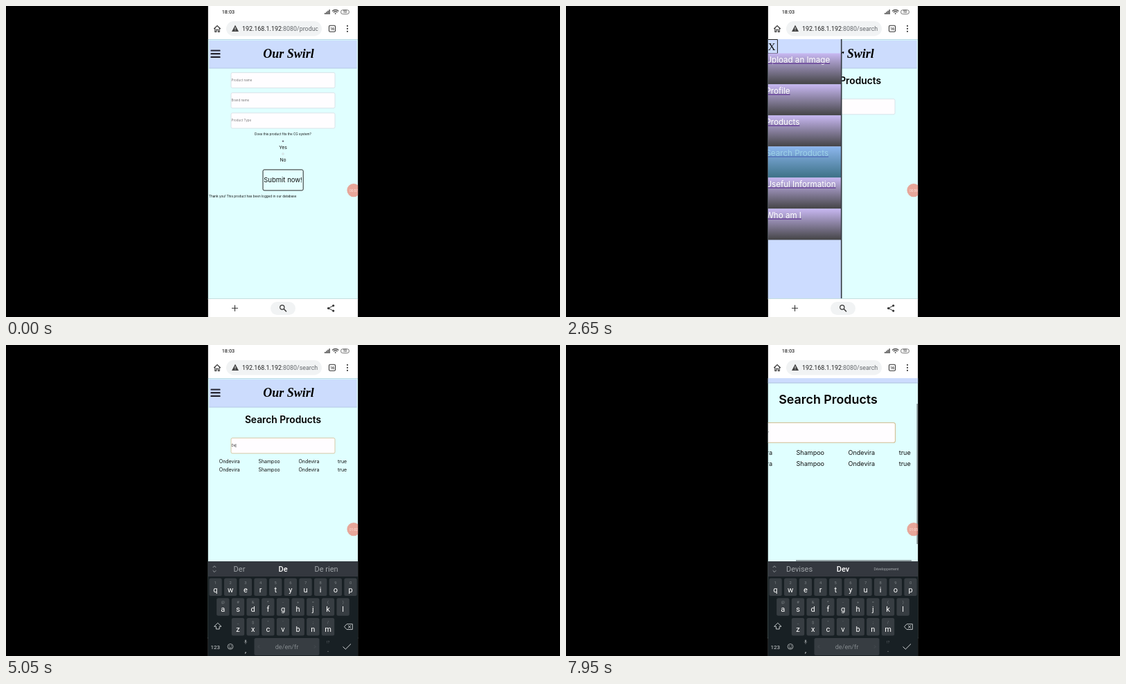
Write an HTML page with a canvas that moves like this. It is 800 px wide and 450 px high and loops after 8 s.

```html
<!DOCTYPE html>
<html lang="en">
<head>
<meta charset="utf-8">
<title>Product search demo</title>
<style>
  html, body { margin: 0; width: 100%; height: 100%; overflow: hidden; background: #000; }
  canvas { display: block; width: 100vw; height: 100vh; }
</style>
</head>
<body>
<canvas id="stage"></canvas>
<script>
const canvas = document.getElementById('stage');
const ctx = canvas.getContext('2d');
const ratio = window.devicePixelRatio || 1;
canvas.width = 800 * ratio;
canvas.height = 450 * ratio;

const LOOP = 8000, STEP = 50;
const LEFT = 291.6, TOP = 48, WIDTH = 216.7;
const SANS = 'Inter, sans-serif', UI = 'Roboto, sans-serif', SERIF = '"Liberation Serif", serif';
const TIMES = { open: 150, close: 2630, hover: 2300, search: 2650, rows: 2800, focus: 3750,
                keyboard: 3900, typed: [4700, 4950, 5450], zoom: 7800 };

const MENU = ['Upload an Image', 'Profile', 'Products', 'Search Products', 'Useful Information', 'Who am I'];
const ROWS = `Ondevira|Shampoo|Ondevira|true
Ondevira|Shampoo|Ondevira|true
e;flke;lkfle|e;lrkf;lerkf|;ewlkf;ewlkdf|
e;flkg;elrf|e;flk;elfk|e;lfk;elfkv|
elkf;elkrf|feferferf|esfsef|
dsfvzdsfgsfd|asfsdf|sfdsdfsd|true
dsfvsdfv|sdfvdsf|sdfvsdfv|
sdfsdf|asdfasdf|sfdvsfdv|
dlfkjdlfkjdlkjsklf|sdlkfjsl;kfj|sdfdks;ldkfkls|
sadfas|adfasd|adsfasd|
asdfasdf|adsfasd|adsfasdf|
ffff|fff|fff|
elkfjlekrf|lkfjlekjdf|lekfjlkjdf|true
asdfasda|asdfasdf|sdfasdf|true
sadfasdadsfasa|adfasdf|sdfasdf|
sdfasdfad|adfasdf|asdfasdf|true
fadfadf|adfasdaf|adsfadf|true
asdfasdf|adfasdf|adfasdfa|true
Hdjd|Dudud|Djdhd|false
funky chicken|conditioner|spiced brand|false
dganit|dganit|dganit|true
dddd|dddd|dddd|`.split('\n').map(row => row.split('|'));

const clamp = v => Math.min(1, Math.max(0, v));
const cubic = (u, a, b) => 3 * u * (1 - u) ** 2 * a + 3 * u * u * (1 - u) * b + u ** 3;

// CSS "ease" timing curve
function ease(p) {
  let lo = 0, hi = 1;
  for (let i = 0; i < 20; i++) {
    const mid = (lo + hi) / 2;
    if (cubic(mid, .25, .25) < p) lo = mid; else hi = mid;
  }
  return cubic(hi, .1, 1);
}

function rect(x, y, w, h, fill) {
  ctx.fillStyle = fill;
  ctx.fillRect(x, y, w, h);
}

function box(x, y, w, h, r, fill, stroke, line = 1) {
  ctx.beginPath();
  ctx.roundRect(x, y, w, h, r);
  if (fill) { ctx.fillStyle = fill; ctx.fill(); }
  if (stroke) { ctx.strokeStyle = stroke; ctx.lineWidth = line; ctx.stroke(); }
}

function circle(x, y, r, fill, stroke, line = 1) {
  box(x - r, y - r, 2 * r, 2 * r, r, fill, stroke, line);
}

function path(d, stroke, line = 1, fill) {
  const shape = new Path2D(d);
  if (fill) { ctx.fillStyle = fill; ctx.fill(shape); }
  if (stroke) { ctx.strokeStyle = stroke; ctx.lineWidth = line; ctx.stroke(shape); }
}

// y is the middle of the capitals
function text(str, x, y, size, color = '#111', align = 'left', family = SANS, style = '') {
  ctx.font = `${style} ${size}px ${family}`;
  ctx.textAlign = align;
  ctx.fillStyle = color;
  ctx.fillText(str, x, y + size * .36);
}

function clipped(x, y, w, h, draw) {
  ctx.save();
  ctx.beginPath();
  ctx.rect(x, y, w, h);
  ctx.clip();
  draw();
  ctx.restore();
}

function browserBar(address) {
  rect(LEFT, 0, WIDTH, TOP, '#fff');
  text('18:03', 311.7, 8.8, 7.3, '#333', 'left', UI, '500');
  for (let i = 0; i < 4; i++) rect(460 + i * 2.1, 10 - i * 1.6, 1.6, 2 + i * 1.6, '#555');
  path('M471 7.5Q475.7 3.5 480.4 7.5M472.8 9.2Q475.7 6.8 478.6 9.2', '#555', 1.3);
  circle(475.7, 11, 1, '#555');
  box(483.5, 5.7, 12, 6, 3, null, '#666', .9);
  text('50', 489.5, 8.8, 4.6, '#444', 'center', UI, '500');

  path('M300.3 33L305 28.5L309.7 33M301.8 32V37.5H303.7V34.3H306.3V37.5H308.2V32', '#333', 1.1);
  box(318, 22, 138, 21.5, 10.7, '#f1f3f4');
  path('M331 27.5L336 37H326Z', null, 0, '#444');
  rect(330.5, 30.8, 1, 3, '#f1f3f4');
  rect(330.5, 34.6, 1, 1, '#f1f3f4');
  clipped(340, 22, 110.5, 22, () => {
    text('192.168.1.192', 341, 33, 8.9, '#222', 'left', UI);
    text(':8080/' + address, 341 + ctx.measureText('192.168.1.192').width, 33, 8.9, '#666a6e', 'left', UI);
  });
  box(466.5, 28.2, 9, 9, 1.5, null, '#333', 1.1);
  text('16', 471, 32.8, 5, '#333', 'center', UI, 'bold');
  for (const y of [28.8, 32.8, 36.8]) circle(493, y, 1.1, '#333');
}

function bottomBar() {
  rect(LEFT, 423, WIDTH, 1, '#c5dede');
  rect(LEFT, 424, WIDTH, 26, '#fff');
  path('M326 437.2H335M330.5 432.7V441.7', '#333', 1.1);
  box(382, 428, 36, 19, 9.5, '#f1f3f4');
  circle(398.8, 436, 3.1, null, '#333', 1.2);
  path('M401.1 438.3L405 442.2', '#333', 1.4);
  path('M472.6 433.6L465.6 437.3L472.6 441', '#333', 1);
  for (const [x, y] of [[472.7, 433.5], [465.6, 437.3], [472.7, 441.1]]) circle(x, y, 1.6, '#333');
}

function pageHeader() {
  rect(LEFT, TOP, WIDTH, 377, '#e0ffff');
  rect(LEFT, 48, WIDTH, 1.2, '#bcd8e8');
  rect(293, 50, 214, 40, '#ccdcfd');
  rect(293, 89.5, 214, 1, '#b6c9e6');
  for (const y of [63.4, 68.1, 72.8]) box(295.5, y, 14, 2.2, .6, '#252530');
  text('Our Swirl', 408, 68.5, 18, '#000', 'center', SERIF, 'italic bold');
}

function field(y, hint, border = '#d5dde4') {
  box(325, y, 150, 22.2, 2, '#fffdff', border, .8);
  text(hint, 325.6, y + 11, 4.5, '#777');
}

function productPage() {
  ['Product name', 'Brand name', 'Product Type'].forEach((hint, i) => field(96.4 + i * 29.2, hint));
  text('Does this product fits the CG system?', 400, 185, 4.6, '#111', 'center');
  circle(400, 195.6, 1.2, '#667');
  text('Yes', 400, 204.2, 6.8, '#111', 'center');
  circle(400, 214, 1.3, '#eef8f8', '#b5c5c8', .5);
  text('No', 400, 223, 6.8, '#111', 'center');
  box(371, 236.9, 58.2, 30, 2, '#e4ffff', '#2a2a2a');
  text('Submit now!', 400, 252, 9.5, '#111', 'center');
  text('Thank you! This product has been logged in our database', 293, 275, 4.65);
}

function tableRow(cells, y) {
  ctx.font = `7px ${SANS}`;
  const widths = cells.map(cell => ctx.measureText(cell).width);
  const gap = (211 - widths.reduce((a, b) => a + b)) / cells.length;
  let x = 294.5 + gap / 2;
  cells.forEach((cell, i) => {
    text(cell, x, y, 7);
    x += widths[i] + gap;
  });
}

function searchPage(t, typed) {
  const focused = t >= TIMES.focus;
  text('Search Products', 400, 108.3, 13.8, '#000', 'center', SANS, '600');
  field(134.6, typed ? '' : 'Search a Product', focused ? '#d0bd91' : undefined);
  if (typed) text(typed, 325.6, 145.8, 4.4, '#222');
  if (focused && cursorOn(t)) {
    ctx.font = `4.4px ${SANS}`;
    rect(325.9 + ctx.measureText(typed).width, 143, .6, 5.2, '#222');
  }
  if (t < TIMES.rows) return;
  const rows = typed ? ROWS.slice(0, 2) : ROWS;
  rows.forEach((cells, i) => tableRow(cells, 168.4 + i * 12.2));
}

function cursorOn(t) {
  const restart = [TIMES.focus, ...TIMES.typed, 7200].filter(k => k <= t).pop();
  return (t - restart) % 1000 < 500;
}

function menu(t) {
  const open = t < TIMES.close ? ease(clamp((t - TIMES.open) / 500))
                               : 1 - ease(clamp((t - TIMES.close) / 450));
  if (open <= 0) return;
  ctx.save();
  ctx.translate(-111 * (1 - open), 0);
  rect(LEFT, TOP, 109, 376, '#ccdcff');
  box(292.5, 48.5, 16, 20, 0, null, '#222');
  text('X', 300.3, 59, 15, '#111', 'center', SERIF);
  MENU.forEach((label, i) => {
    const y = 68.4 + i * 45;
    const shade = ctx.createLinearGradient(0, y, 0, y + 45);
    shade.addColorStop(0, '#c8b8f2');
    shade.addColorStop(1, '#444446');
    rect(LEFT, y, 109, 45, shade);
    text(label, 291.5, y + 9, 11.6, i === 3 && t >= TIMES.hover ? '#e4e4ea' : '#fff');
    rect(291.5, y + 14.2, ctx.measureText(label).width, 1, '#52208c');
    if (i === 3 && t >= TIMES.search && t < 2800) rect(LEFT, y, 109, 45, 'rgba(51,181,229,.4)');
  });
  rect(400, TOP, 1.6, 376, '#333840');
  ctx.restore();
}

function keyRow(letters, hints, firstX, y, upper) {
  [...letters].forEach((letter, i) => {
    const x = firstX + i * 21.67;
    box(x - 9.2, y, 18.4, 25.5, 2.5, '#373d42');
    text(hints[i], x, y + 6, 5.8, '#7b8084', 'center', UI);
    text(upper ? letter.toUpperCase() : letter, x, y + 16.2, 11, '#fff', 'center', UI);
  });
}

function keyboard(t, typed) {
  if (t < TIMES.keyboard) return;
  const p = clamp((t - TIMES.keyboard + STEP) / 300);
  ctx.save();
  ctx.translate(0, 137 * (1 - p) ** 2);
  rect(LEFT, 313, WIDTH, 137, '#182024');
  rect(LEFT, 313, WIDTH, 22, '#34383f');
  path('M298.7 322L301 319.7L303.3 322M298.7 326.3L301 328.6L303.3 326.3', '#a0a5a9', .9);
  const [before, after, size] = { De: ['Der', 'De rien', 11], Dev: ['Devises', 'Développement', 5.2] }[typed] || ['', '', 11];
  text(before, 337, 324.3, 11, '#a0a5a9', 'center', UI);
  text(typed, 400, 324.3, 11, '#fff', 'center', UI, '500');
  text(after, 462.5, 324.3, size, '#a0a5a9', 'center', UI);

  const upper = !typed;
  keyRow('qwertyuiop', '1234567890', 302.5, 337.5, upper);
  keyRow('asdfghjkl', '@#&*-+=()', 313.3, 366.2, upper);
  keyRow('zxcvbnm', '_$"\':;/', 335, 395, upper);
  path('M305.8 402.2L311 407.3H308.2V411H303.4V407.3H300.6Z', '#d5d8da', .9, upper ? '#d5d8da' : null);
  path('M488.5 407.7L492 403.8H500.3V411.6H492ZM494 405.8L498 409.7M498 405.8L494 409.7', '#d5d8da', .9);

  text('123', 302.3, 436.7, 8, '#d5d8da', 'center', UI);
  circle(324, 436.4, 3.9, null, '#c5c8ca', .8);
  circle(322.6, 435.3, .6, '#c5c8ca');
  circle(325.4, 435.3, .6, '#c5c8ca');
  path('M321.8 437.4Q324 440 326.2 437.4', '#c5c8ca', .8);
  box(344.9, 426.5, 2.2, 4, 1.1, '#83888b');
  path('M343.8 429.5Q346 433 348.2 429.5M346 431.3V433', '#83888b', .6);
  text(',', 346, 441, 10, '#fff', 'center', UI);
  box(358.5, 424, 94, 25, 2.5, '#373d42');
  text('de/en/fr', 405.5, 436.8, 9.1, '#848a8e', 'center', UI);
  path('M366 434.5L364 436.5L366 438.5M445 434.5L447 436.5L445 438.5', '#4d5459', .8);
  text('!?', 465, 430, 5.8, '#60666a', 'center', UI);
  text('.', 465, 440, 10, '#aaa', 'center', UI);
  path('M486.5 436.5L490.3 440.2L498 432.5', '#d5d8da', 1);
  ctx.restore();
}

function timerBadge(t) {
  const seconds = 57 + Math.floor((t + 50) / 1000);
  const pad = n => String(n).padStart(2, '0');
  circle(502, 266.6, 9.6, 'rgba(236,118,98,.64)');
  text(`${pad(Math.floor(seconds / 60))}:${pad(seconds % 60)}`, 502, 266.8, 4.9, '#fbe4de', 'center', UI);
}

function page(t, typed) {
  const zoom = 1 + .293 * clamp((t - TIMES.zoom) / 150);
  ctx.save();
  ctx.translate(473.4, 210);
  ctx.scale(zoom, zoom);
  ctx.translate(-473.4, -210);
  pageHeader();
  if (t < TIMES.search) productPage(); else searchPage(t, typed);
  ctx.restore();
  if (zoom > 1) {
    rect(LEFT + WIDTH - 2, 85, 2, 203, '#8d9a9d');
    rect(332, 311, 167, 1.8, '#8d9a9d');
  }
}

function draw(t) {
  const typed = 'Dev'.slice(0, TIMES.typed.filter(k => k <= t).length);
  ctx.setTransform(ratio, 0, 0, ratio, 0, 0);
  rect(0, 0, 800, 450, '#000');
  clipped(LEFT, 0, WIDTH, 450, () => {
    // The zoomed page may end short of the right edge
    rect(LEFT, TOP, WIDTH, 377, '#e0ffff');
    clipped(LEFT, TOP, WIDTH, 376, () => {
      page(t, typed);
      menu(t);
    });
    browserBar(t < TIMES.search ? 'products' : 'search');
    bottomBar();
    keyboard(t, typed);
    timerBadge(t);
  });
}

function tick(now) {
  draw(Math.floor(now % LOOP / STEP) * STEP);
  requestAnimationFrame(tick);
}
draw(0);
requestAnimationFrame(tick);
</script>
</body>
</html>
```
